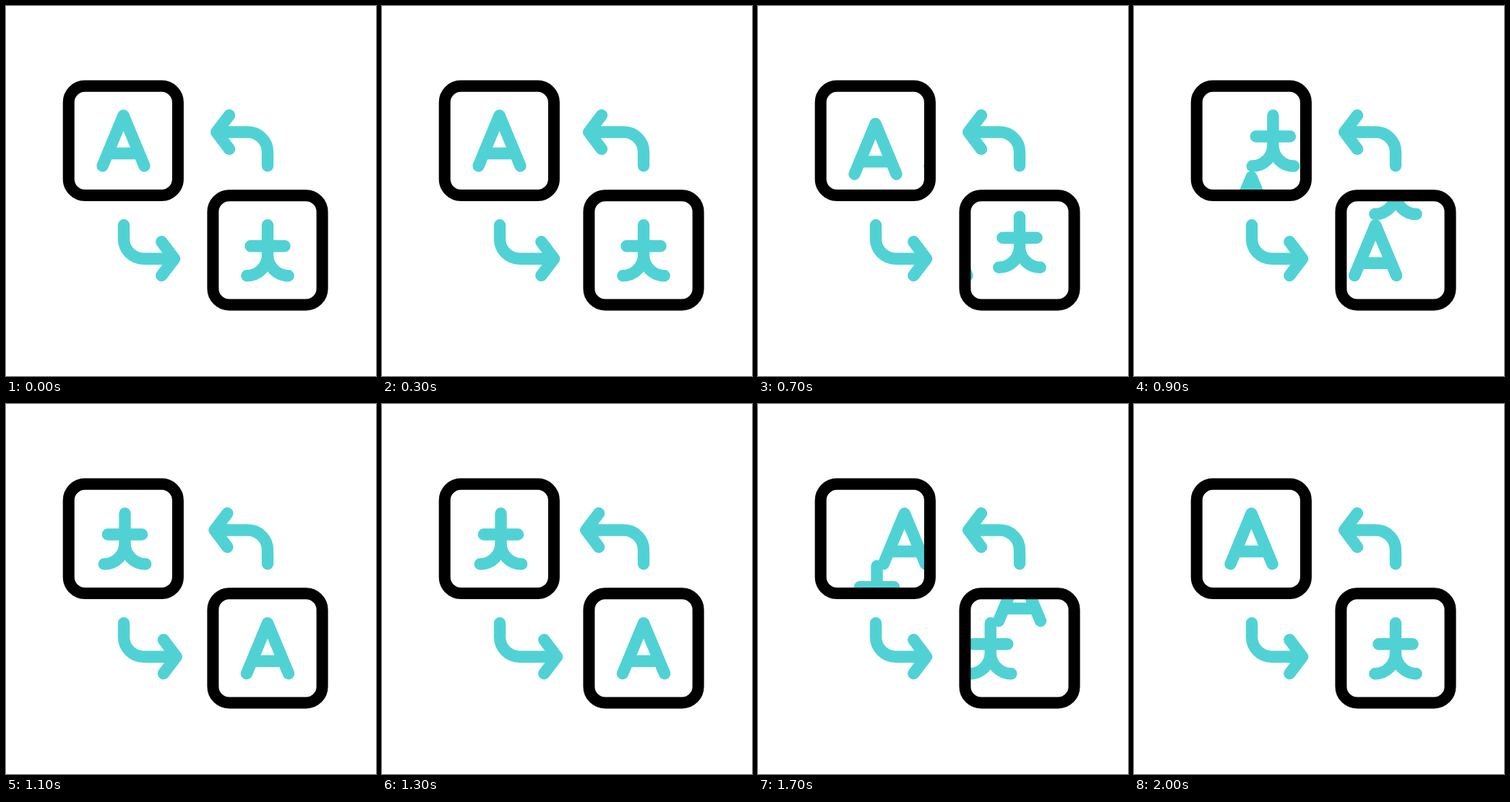
An HTML page that plays this animation: 512x512 px, repeating every 2.1 s.

```html
<!DOCTYPE html>
<html lang="en">
<head>
<meta charset="utf-8">
<title>Translate icon</title>
<style>
  html, body { margin: 0; width: 100%; height: 100%; overflow: hidden; background: #fff; }
  svg { display: block; width: 100%; height: 100%; }
  .line { fill: none; stroke: #50d2d5; stroke-width: 16.4; stroke-linecap: round; stroke-linejoin: round; }
  .box { fill: none; stroke: #000; stroke-width: 16; }
</style>
</head>
<body>
<svg viewBox="0 0 512 512">
  <defs>
    <!-- Glyphs are centred on x = 0, with the top stroke end at y = 0. -->
    <path id="latin" d="M-29 69.8L0 0L29 69.8M-21 52.5H21"/>
    <path id="han" d="M0 0V42M-23.6 29H23.6M-28.7 70A28.7 28.7 0 0 0 0 41.3A28.7 28.7 0 0 0 28.7 70"/>
    <rect id="frame" width="151.2" height="151.2" rx="22.5"/>
    <clipPath id="clipTop"><use href="#frame" x="86.7" y="110.7"/></clipPath>
    <clipPath id="clipBottom"><use href="#frame" x="286.4" y="262.3"/></clipPath>
  </defs>

  <g class="line" clip-path="url(#clipTop)">
    <use id="topLatin" href="#latin"/>
    <use id="topHan" href="#han"/>
  </g>
  <g class="line" clip-path="url(#clipBottom)">
    <use id="bottomLatin" href="#latin"/>
    <use id="bottomHan" href="#han"/>
  </g>

  <use class="box" href="#frame" x="86.7" y="110.7"/>
  <use class="box" href="#frame" x="286.4" y="262.3"/>

  <path id="arrowLeft" class="line"/>
  <path id="arrowRight" class="line"/>
</svg>
<script>
const LOOP = 2100, STEP = 100;
const PHASE = 417;          // length of a swap and of an arrow nudge
const TRAVEL = 113, NUDGE = 11;
const SWAP_OUT = 618, SWAP_BACK = 1451;

const byId = id => document.getElementById(id);
const ease = u => {
  u = Math.min(1, Math.max(0, u));
  return u * u * (3 - 2 * u);
};
const swap = (t, start) => ease((t - start) / PHASE);

// Out and back within the phase that begins at start.
const nudge = (t, start) => ease(1 - Math.abs((t - start) / PHASE * 2 - 1));

function place(id, x, y) {
  byId(id).setAttribute("transform", `translate(${x} ${y})`);
}

function draw(t) {
  const out = swap(t, SWAP_OUT), back = swap(t, SWAP_BACK);
  const returning = t >= SWAP_BACK;
  const latinX = returning ? TRAVEL * (1 - back) : 0;
  const latinY = returning ? 0 : TRAVEL * out;
  const hanX = TRAVEL * (1 - out), hanY = TRAVEL * back;

  place("topLatin", 162.5 + latinX, 151.5 + latinY);
  place("topHan", 164.5 + hanX, 151.5 + hanY);
  place("bottomLatin", 362 - hanX, 303.2 - hanY);
  place("bottomHan", 362 - latinX, 303.2 - latinY);

  const push = NUDGE * (nudge(t, SWAP_OUT - PHASE) + nudge(t, SWAP_BACK - PHASE));
  const left = 291.3 - push, right = 233 + push;
  byId("arrowLeft").setAttribute("d",
    `M362 221.3V202A27.5 27.5 0 0 0 334.5 174.5H${left}m17.7 -23.3l-17.7 23.3l17.7 23.5`);
  byId("arrowRight").setAttribute("d",
    `M163 303.2V322.2A27.5 27.5 0 0 0 190.5 349.7H${right}m-17.7 -23.5l17.7 23.5l-17.7 23.3`);
}

let startTime;
function tick(now) {
  startTime ??= now;
  const t = (now - startTime + 16) % LOOP;
  draw(Math.floor(t / STEP) * STEP);
  requestAnimationFrame(tick);
}
draw(0);
requestAnimationFrame(tick);
</script>
</body>
</html>
```
